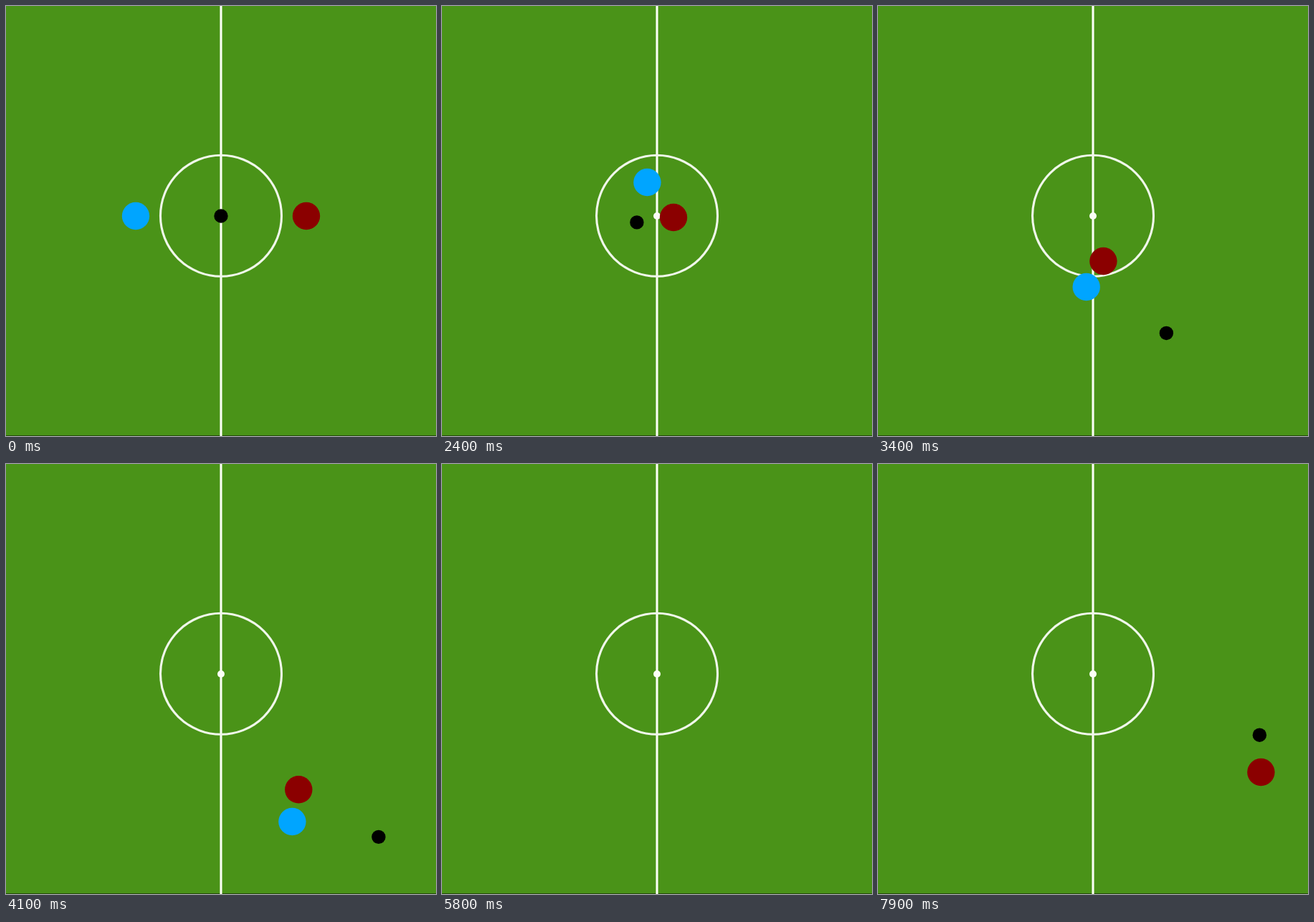
An HTML page for the animation above (8 s loop, 600 by 600 pixels).

```html
<!DOCTYPE html>
<html lang="en">
<head>
<meta charset="utf-8">
<title>Pitch</title>
<style>
  html, body { margin: 0; width: 100%; height: 100%; overflow: hidden; background: #4a9318; }
  svg { display: block; width: 100%; height: 100%; }
</style>
</head>
<body>
<svg viewBox="0 0 600 600">
  <rect width="600" height="600" fill="#4a9318"/>
  <rect y="599" width="600" height="1" fill="#254a0c"/>
  <g fill="none" stroke-width="3.1">
    <path d="M300 0V600" stroke="#fbfff6"/>
    <circle cx="300" cy="292.8" r="84.5" stroke="#f0f7ea"/>
  </g>
  <circle cx="300" cy="293" r="5" fill="#fbfff6"/>
  <circle id="ball" r="9.7" fill="#000"/>
  <circle id="red" r="19.2" fill="#8b0000"/>
  <circle id="blue" r="19.2" fill="#00a5ff"/>
</svg>
<script>
const LOOP = 8000, STEP = 100;
const FRICTION = 0.0021; // ball speed lost per ms

// Each kick sends the ball from (x, y) to roll (dx, dy) before friction stops it.
const kicks = [
  { at: 0,    x: 300, y: 293, dx: 0,    dy: 0 },
  { at: 2200, x: 300, y: 293, dx: -82,  dy: 26 },
  { at: 2500, x: 260, y: 306, dx: -66,  dy: 74 },
  { at: 3020, x: 216, y: 355, dx: 339,  dy: 184.5 },
  { at: 4400, x: 537, y: 530, dx: 196,  dy: 227 },
  { at: 6600, x: 667, y: 625, dx: -144, dy: -264 }
];

// Turning points of each run: [time in ms, x, y]
const runs = {
  blue: [
    [1300, 181, 293], [1800, 219, 293], [2400, 286.4, 246], [2950, 191, 330],
    [3400, 290.7, 392], [4100, 399.4, 499], [4700, 568.7, 520.7], [5000, 650, 525]
  ],
  red: [
    [1300, 419, 293], [1800, 389, 293], [2400, 323, 295], [3400, 314.4, 356],
    [4100, 408.3, 454.3], [4700, 465.4, 514.2], [5400, 640, 525],
    [6400, 640, 516], [7000, 530.2, 503.3], [7250, 572, 517], [7900, 534.4, 430]
  ]
};

function ballAt(t) {
  const kick = kicks.filter(k => k.at <= t).pop();
  const rolled = 1 - Math.exp(-FRICTION * (t - kick.at));
  return [kick.x + kick.dx * rolled, kick.y + kick.dy * rolled];
}

const slope = (a, b, k) => (b[k] - a[k]) / (b[0] - a[0]);

// Harmonic-mean tangent keeps the curve from overshooting its turning points.
function tangent(run, i, k) {
  if (i === 0 || i === run.length - 1) return 0;
  const before = slope(run[i - 1], run[i], k);
  const after = slope(run[i], run[i + 1], k);
  return before * after > 0 ? 2 * before * after / (before + after) : 0;
}

function playerAt(run, time) {
  const last = run.length - 1;
  const t = Math.min(Math.max(time, run[0][0]), run[last][0]);
  const i = Math.max(run.findIndex(p => p[0] >= t) - 1, 0);
  const a = run[i], b = run[i + 1], span = b[0] - a[0];
  const u = (t - a[0]) / span, v = 1 - u;
  return [1, 2].map(k =>
    a[k] * v * v * (1 + 2 * u) + b[k] * u * u * (1 + 2 * v)
    + span * u * v * (tangent(run, i, k) * v - tangent(run, i + 1, k) * u));
}

function place(id, [x, y]) {
  const disc = document.getElementById(id);
  disc.setAttribute("cx", x);
  disc.setAttribute("cy", y);
}

function draw(t) {
  place("ball", ballAt(t));
  for (const id in runs) place(id, playerAt(runs[id], t));
}

const start = performance.now();
function tick() {
  const t = (performance.now() - start) % LOOP;
  draw(Math.floor(t / STEP) * STEP);
  requestAnimationFrame(tick);
}
tick();
</script>
</body>
</html>
```
